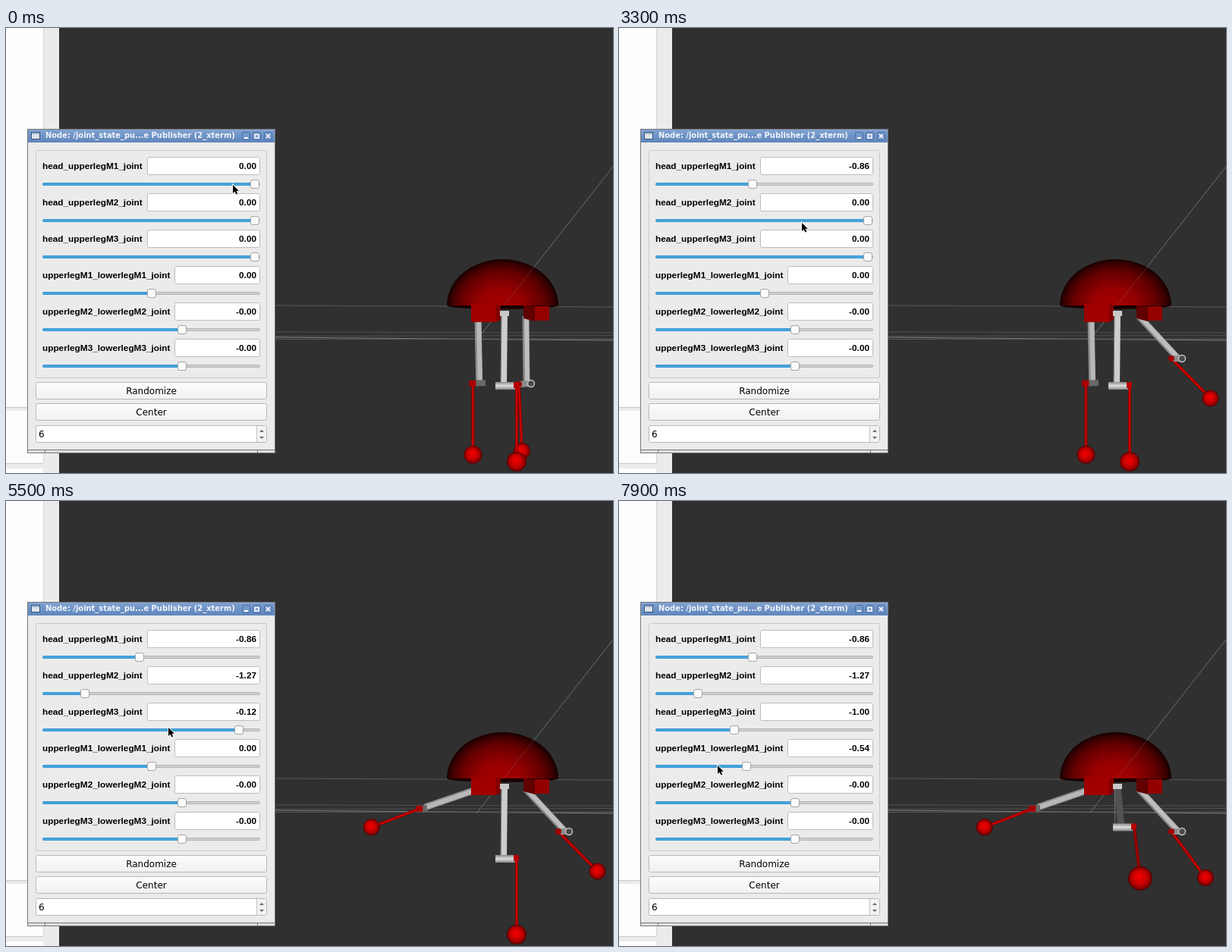
An HTML page with a canvas for the animation above (8 s loop, 800 px wide and 587 px high).

```html
<!DOCTYPE html>
<html lang="en">
<head>
<meta charset="utf-8">
<title>Joint state sliders</title>
<style>
html, body { margin: 0; height: 100%; overflow: hidden; background: #313031; }
canvas { display: block; }
</style>
</head>
<body>
<canvas id="stage" width="800" height="587"></canvas>
<script>
const g = document.getElementById('stage').getContext('2d');
const LOOP = 8000, STEP = 100, LEG_LAG = 100;

// Keyframes: [ms, value...]
const cursorKeys = [
  [0, 299, 207], [400, 328, 204], [700, 328, 203], [1200, 193, 202], [1500, 177, 203],
  [2000, 177, 204], [2600, 326, 254], [2900, 328, 255], [3300, 241, 257], [3600, 103, 248],
  [4300, 103, 247], [5000, 328, 300], [5200, 328, 300], [5500, 214, 299], [5800, 156, 301],
  [6600, 156, 301], [7200, 190, 349], [7600, 190, 349], [7900, 130, 349]
];
const sliders = [
  { name: 'head_upperlegM1_joint', zero: 328, scale: 176.6,
    keys: [[600, 0], [800, -.2], [1000, -.28], [1200, -.28], [1400, -.6], [1600, -.86]] },
  { name: 'head_upperlegM2_joint', zero: 328, scale: 176.6, keys: [[3600, 0], [3900, -1.27]] },
  { name: 'head_upperlegM3_joint', zero: 328, scale: 176.6,
    keys: [[5400, 0], [5500, -.12], [5900, -.8], [6300, -.996]] },
  { name: 'upperlegM1_lowerlegM1_joint', zero: 191.5, scale: 43.5,
    keys: [[7600, 0], [7800, -.14], [7900, -.54]] },
  { name: 'upperlegM2_lowerlegM2_joint', zero: 232, scale: 43.5, keys: [[0, -0.0001]] },
  { name: 'upperlegM3_lowerlegM3_joint', zero: 232, scale: 43.5, keys: [[0, -0.0001]] }
];

const mix = (a, b, k) => a + (b - a) * k;

function sample(keys, t) {
  if (t <= keys[0][0]) return keys[0].slice(1);
  for (let i = 1; i < keys.length; i++) {
    const [a, b] = [keys[i - 1], keys[i]];
    if (t < b[0]) return b.slice(1).map((v, j) => mix(a[j + 1], v, (t - a[0]) / (b[0] - a[0])));
  }
  return keys[keys.length - 1].slice(1);
}

function rect(x, y, w, h, fill) {
  g.fillStyle = fill;
  g.fillRect(x, y, w, h);
}

function box(x, y, w, h, r, fill, border) {
  g.beginPath();
  g.roundRect(x + .5, y + .5, w - 1, h - 1, r);
  g.fillStyle = fill;
  g.fill();
  g.strokeStyle = border;
  g.lineWidth = 1;
  g.stroke();
}

function poly(fill, ...pts) {
  g.beginPath();
  for (let i = 0; i < pts.length; i += 2) g.lineTo(pts[i], pts[i + 1]);
  g.closePath();
  g.fillStyle = fill;
  g.fill();
}

function line(a, b, color, width = 1) {
  g.beginPath();
  g.moveTo(...a);
  g.lineTo(...b);
  g.strokeStyle = color;
  g.lineWidth = width;
  g.stroke();
}

function text(str, x, y, font, align = 'left', color = '#000') {
  g.font = font;
  g.textAlign = align;
  g.fillStyle = color;
  g.fillText(str, x, y);
}

function shade(x0, y0, x1, y1, ...colors) {
  const grad = g.createLinearGradient(x0, y0, x1, y1);
  colors.forEach((c, i) => grad.addColorStop(i / (colors.length - 1), c));
  return grad;
}

function ball([x, y], r) {
  const grad = g.createRadialGradient(x - r * .12, y - r * .2, 0, x, y, r);
  grad.addColorStop(0, '#f40000');
  grad.addColorStop(.5, '#d00000');
  grad.addColorStop(.8, '#9c0000');
  grad.addColorStop(1, '#500000');
  g.beginPath();
  g.arc(x, y, r, 0, 7);
  g.fillStyle = grad;
  g.fill();
}

function bar(a, b, width, light, dark) {
  line(a, b, dark, width);
  line([a[0] + 1, a[1]], [b[0] + 1, b[1]], light, width - 3);
}

function rod(a, b, color = '#c80000') {
  line(a, b, '#700000', 4);
  line(a, b, color, 2.5);
}

// Quadratic through the poses at three hip angles
const poses = (a, p, q, r) => {
  const [u, v] = [.28, .86];
  const wp = (a - u) * (a - v) / (u * v);
  const wq = a * (a - v) / (u * (u - v));
  const wr = a * (a - u) / (v * (v - u));
  return [0, 1].map(i => wp * p[i] + wq * q[i] + wr * r[i]);
};

const swing = (k, len0, len1, ang0, ang1) => {
  const len = mix(len0, len1, k), ang = mix(ang0, ang1, k);
  return [622 - len * Math.sin(ang), 380 + len * Math.cos(ang)];
};

function legRight(hip, knee) {
  const end = poses(hip, [692, 469], [709, 466], [742, 436]);
  const top = poses(hip, [676, 470], [694, 465], [728, 436]);
  const foot = poses(hip, [680, 558], [712, 549], [779.5, 488.5]);
  foot[0] -= 6.5 * knee / .14;
  foot[1] += 8.5 * knee / .14;
  bar([685, 380], [end[0] - 6, end[1] - 1], 9, '#bebebe', '#868686');
  rod(top, foot);
  ball(foot, 11);
  line(top, end, '#8c8c8c', 8);
  g.beginPath();
  g.arc(...top, 4, 0, 7);
  g.fillStyle = '#a00000';
  g.fill();
  g.beginPath();
  g.arc(...end, 4.5, 0, 7);
  g.fillStyle = '#4a4a4a';
  g.fill();
  g.strokeStyle = '#c4c4c4';
  g.lineWidth = 1.5;
  g.stroke();
}

function legLeft(hip) {
  const k = hip / 1.27;
  const knee = swing(k, 88, 74, -.02, 1.24);
  const top = swing(k, 89, 81, .075, 1.245);
  const foot = swing(k, 183, 149, .036, 1.227);
  bar([622, 380], knee, 9, '#b8b8b8', '#8e8e8e');
  line(top, [mix(632, 555, k), mix(468, 405, k)], '#686868', 8);
  rod(top, foot);
  rect(top[0] - 5, top[1] - 4, 9, 8, '#a80000');
  ball(foot, mix(12, 11, k));
}

function legFront(hip) {
  const depth = Math.sin(hip), k = depth / .8415;
  const drop = Math.cos(hip) / (1 - .142 * depth);
  const x = mix(657, 663, k), y = mix(472, 430, (1 - drop) / .386);
  const foot = [673 + 14 * k, 378 + 194 * drop];
  const tone = Math.round(mix(205, 82, k));
  line([657, 376], [x - 1, y], `rgb(${tone},${tone},${tone})`, mix(8, 9, k));
  line([653, 376], [652 + 2 * k, y], '#777', 1);
  rect(651, 373, 12, 7, '#c8c8c8');
  rod([x + 16, y], foot, k > .5 ? '#a00000' : '#cc0000');
  rect(x - 12, y - 5, 26, 10, shade(0, y - 5, 0, y + 5, '#8a8a8a', '#dedede', '#858585'));
  rect(x + 12, y - 5, 7, 8, '#b40000');
  ball(foot, 13 + 3 * k);
}

function dome() {
  g.save();
  g.translate(654.5, 366);
  g.beginPath();
  g.ellipse(0, 0, 73, 5, 0, 0, 7);
  g.fillStyle = '#180000';
  g.fill();
  g.scale(73.5, 61);
  const grad = g.createRadialGradient(-.08, .05, 0, 0, 0, 1);
  grad.addColorStop(0, '#a80000');
  grad.addColorStop(.4, '#960000');
  grad.addColorStop(.75, '#640000');
  grad.addColorStop(.92, '#380000');
  grad.addColorStop(1, '#140000');
  g.beginPath();
  g.arc(0, 0, 1, Math.PI, 0);
  g.fillStyle = grad;
  g.fill();
  g.restore();
}

function scene(angle) {
  rect(0, 0, 800, 587, '#313031');
  line([355, 366], [800, 368], '#585858');
  line([355, 401], [800, 402], '#505050');
  line([355, 406.5], [800, 405.5], '#505050');
  line([355, 408], [800, 412], '#808080');
  line([355, 410.5], [800, 410], '#5a5a5a');
  line([800, 183], [620, 412], '#6c6c6c');

  legRight(angle[0], angle[3]);
  legLeft(angle[1]);
  dome();
  line([697, 314], [657, 365], 'rgba(150,120,120,.3)');

  rect(613, 364, 33, 24, '#a00000');
  poly('#800000', 646, 364, 652, 366, 652, 385, 646, 388);
  poly('#600000', 682, 366, 697, 367, 697, 387, 682, 383);
  rect(697, 367, 19, 19, '#940000');
  legFront(angle[2]);
}

function backPanels() {
  rect(0, 0, 70, 587, '#ebebeb');
  rect(0, 0, 49, 500, '#fefdfe');
  rect(49, 0, 1, 500, '#d4d4d4');
  rect(0, 500, 49, 1, '#c8c8c8');
  rect(0, 505, 49, 69, '#fefdfe');
  rect(49, 505, 1, 69, '#d4d4d4');
  rect(0, 574, 49, 1, '#c8c8c8');
  rect(0, 581, 49, 6, '#fefdfe');
}

function slider({ name, zero, scale }, value, row) {
  const y = 206 + row * 48, x = zero + value * scale;
  const left = row < 3 ? 186 : 222;
  const font = 'bold 11.8px "Liberation Sans", sans-serif';
  text(name, 48, y - 20, font);
  box(left, y - 36, 335 - left, 24, 2, '#fff', '#bdbdbd');
  text(value.toFixed(2), 330, y - 20, font, 'right');
  box(48, y - 2, 287, 4, 2, '#cfcfcf', '#b4b4b4');
  box(48, y - 2, x - 48, 4, 2, '#46a5dc', '#3a98d2');
  box(Math.round(x) - 6, y - 6, 12, 12, 2.5, '#fbfbfb', '#a4a4a4');
}

function dialog(values) {
  rect(28, 133, 327, 428, '#ebebeb');
  rect(28, 133, 327, 18, shade(0, 133, 0, 151, '#86a5d2', '#6f93c6', '#6086bc'));
  rect(33, 137, 12, 10, '#37577f');
  rect(34, 138, 10, 8, '#dce3ea');
  rect(34, 138, 10, 2, '#9fb4cf');
  text('Node: /joint_state_pu...e Publisher (2_xterm)', 52, 145,
    'bold 9.92px "DejaVu Sans", sans-serif', 'left', '#f0f4fa');
  [311, 325, 340].forEach(x => box(x, 137, 11, 11, 1, '#7598cb', '#476ea6'));
  rect(314, 144, 5, 2, '#fff');
  g.strokeStyle = '#fff';
  g.lineWidth = 1.5;
  g.strokeRect(328, 140.5, 5, 4.5);
  line([343, 140], [348, 145], '#fff', 1.5);
  line([348, 140], [343, 145], '#fff', 1.5);

  box(39, 161, 305, 301, 2, '#ebebeb', '#c8c8c8');
  sliders.forEach((s, i) => slider(s, values[i], i));

  const font = '12px "DejaVu Sans", sans-serif';
  ['Randomize', 'Center'].forEach((label, i) => {
    const y = 467 + i * 28;
    box(39, y, 305, 23, 2, shade(0, y, 0, y + 23, '#fdfdfd', '#f0f0f0'), '#b8b8b8');
    text(label, 191.5, y + 16, font, 'center');
  });
  box(39, 524, 305, 23, 2, '#fff', '#b8b8b8');
  rect(331, 525, 12, 21, '#f2f2f2');
  rect(330, 525, 1, 21, '#c4c4c4');
  poly('#666', 334, 533, 340, 533, 337, 530);
  poly('#666', 334, 539, 340, 539, 337, 542);
  text('6', 43, 540, font);

  rect(28, 556, 327, 1, '#777');
  rect(28, 557, 327, 3, '#dedede');
  rect(51, 557, 1, 3, '#777');
  rect(331, 557, 1, 3, '#777');
  g.strokeStyle = '#77797c';
  g.lineWidth = 1;
  g.strokeRect(28.5, 133.5, 326, 427);
}

function cursor(x, y) {
  g.save();
  g.translate(x, y);
  g.beginPath();
  [[0, 0], [0, 11], [2.5, 8.8], [4.4, 12.6], [6.3, 11.7], [4.5, 8], [7.8, 7.8]]
    .forEach(p => g.lineTo(...p));
  g.closePath();
  g.strokeStyle = 'rgba(255,255,255,.8)';
  g.lineWidth = 2;
  g.stroke();
  g.fillStyle = '#000';
  g.fill();
  g.restore();
}

function draw(now) {
  const t = Math.floor(now % LOOP / STEP) * STEP;
  const valuesAt = time => sliders.map(s => sample(s.keys, time)[0]);
  scene(valuesAt(t - LEG_LAG).map(v => -v));
  backPanels();
  dialog(valuesAt(t));
  cursor(...sample(cursorKeys, t));
  requestAnimationFrame(() => draw(performance.now()));
}
draw(0);
</script>
</body>
</html>
```
